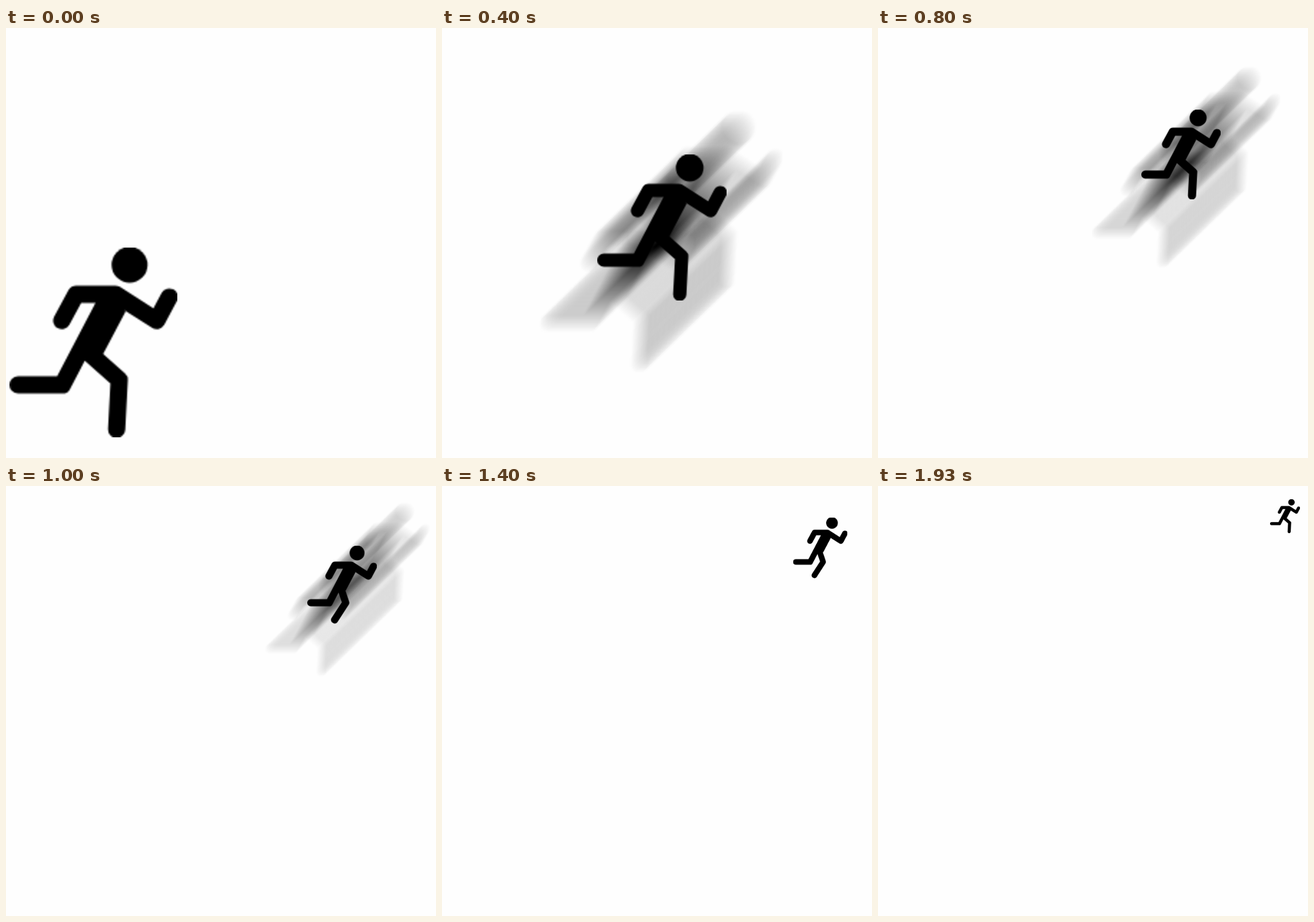
An HTML page with a canvas for the animation above (2.1 s loop, 748 by 748 pixels).

```html
<!DOCTYPE html>
<html lang="en">
<head>
<meta charset="utf-8">
<title>Runner</title>
<style>
  html, body { margin: 0; width: 100%; height: 100%; overflow: hidden; background: #fefefe; }
  canvas { display: block; width: 100vw; height: 100vh; }
</style>
</head>
<body>
<canvas id="stage" width="748" height="748"></canvas>
<script>
const SIZE = 748, LOOP = 2100;
const WIDTH = 292, HEIGHT = 330;
const ctx = document.getElementById('stage').getContext('2d');
ctx.imageSmoothingQuality = 'high';

function makeLayer(width, height) {
  const canvas = document.createElement('canvas');
  canvas.width = width;
  canvas.height = height;
  return canvas.getContext('2d');
}

function limb(c, ...points) {
  c.beginPath();
  points.forEach(([x, y]) => c.lineTo(x, y));
  c.stroke();
}

function frontLeg(c) {
  c.beginPath();
  c.rect(0, 0, WIDTH, HEIGHT);
  c.clip();
  limb(c, [139, 184], [191, 230], [186.5, 316]);
}

// Legs: 'A' stretched forward, 'B' swung back, 'AB' both.
// The low resolution gives soft edges when the sprite is enlarged.
function makeSprite(legs) {
  const c = makeLayer(117, 132);
  c.scale(117 / WIDTH, 132 / HEIGHT);
  c.lineWidth = 30;
  c.lineCap = c.lineJoin = 'round';

  c.beginPath();
  c.arc(209, 30, 31.3, 0, Math.PI * 2);
  c.fill();
  limb(c, [91, 127], [116, 81], [184, 81], [256, 127], [278, 86]);
  limb(c, [15, 239], [92, 239], [163, 103]);

  c.beginPath();
  [[150, 96], [184, 81], [202, 111], [162, 187], [130, 196]].forEach(([x, y]) => c.lineTo(x, y));
  c.fill();

  if (legs.includes('B')) {
    c.save();
    c.translate(111, -56);
    c.rotate(Math.PI / 6);
    frontLeg(c);
    c.restore();
  }
  if (legs.includes('A')) frontLeg(c);
  return c.canvas;
}

const sprites = { A: makeSprite('A'), B: makeSprite('B'), AB: makeSprite('AB') };
const smear = makeLayer(SIZE, SIZE);

function drawRunner(c, x, y, scale, legs) {
  c.drawImage(sprites[legs], x, y, WIDTH * scale, HEIGHT * scale);
}

// Even motion blur along the running direction, centred on (cx, cy).
function drawBlur(cx, cy, scale, reach) {
  const copies = 85;
  const left = cx - WIDTH * scale / 2, top = cy - HEIGHT * scale / 2;
  smear.clearRect(0, 0, SIZE, SIZE);
  smear.globalCompositeOperation = 'lighter';
  smear.globalAlpha = 1 / copies;
  for (let i = 0; i < copies; i++) {
    const shift = reach * (2 * i / (copies - 1) - 1);
    drawRunner(smear, left + shift, top - shift * 0.97, scale, 'A');
  }
  ctx.drawImage(smear.canvas, 0, 0);
}

// Each dash: a blur, then the runner appearing on top of it.
const dashes = [
  { blur: [269.5, 474, 1, 81], runner: [135, 285, 0.935, 'B'] },
  { blur: [381.5, 371.5, 0.93, 76], runner: [270, 220, 0.77, 'A'] },
  { blur: [458, 298, 0.8, 72], runner: [365.5, 177.5, 0.64, 'B'] },
  { blur: [536, 242, 0.66, 68], runner: [458, 142, 0.473, 'A'] },
  { blur: [594, 180, 0.52, 67], runner: [524, 104, 0.415, 'B'] },
  { blur: [649, 117, 0.44, 67], runner: [584, 66, 0.36, 'A'] }
];
const farther = [659, 30, 0.247, 'A'];
const last = [682, 23, 0.178, 'A'];
const scenes = [
  { runners: [[6, 382, 1, 'A']] },
  ...dashes.flatMap(({ blur, runner }) => [{ blur, runners: [] }, { blur, runners: [runner] }]),
  { runners: [[584, 66, 0.36, 'A']] },
  { runners: [[610.5, 54.5, 0.325, 'B']] },
  { runners: [[634, 43, 0.294, 'B']] },
  { runners: [[634, 43, 0.294, 'AB']] },
  { runners: [farther] },
  { runners: [farther, last] },
  { runners: [last] }
];

function sceneAt(time) {
  return time >= 1930 ? 19 : Math.min(18, Math.floor(time / 100));
}

let shown = -1;
const start = performance.now();
function render() {
  const index = sceneAt((performance.now() - start) % LOOP);
  if (index !== shown) {
    shown = index;
    const { blur, runners } = scenes[index];
    ctx.fillStyle = '#fefefe';
    ctx.fillRect(0, 0, SIZE, SIZE);
    if (blur) drawBlur(...blur);
    runners.forEach(runner => drawRunner(ctx, ...runner));
  }
  requestAnimationFrame(render);
}
render();
</script>
</body>
</html>
```
